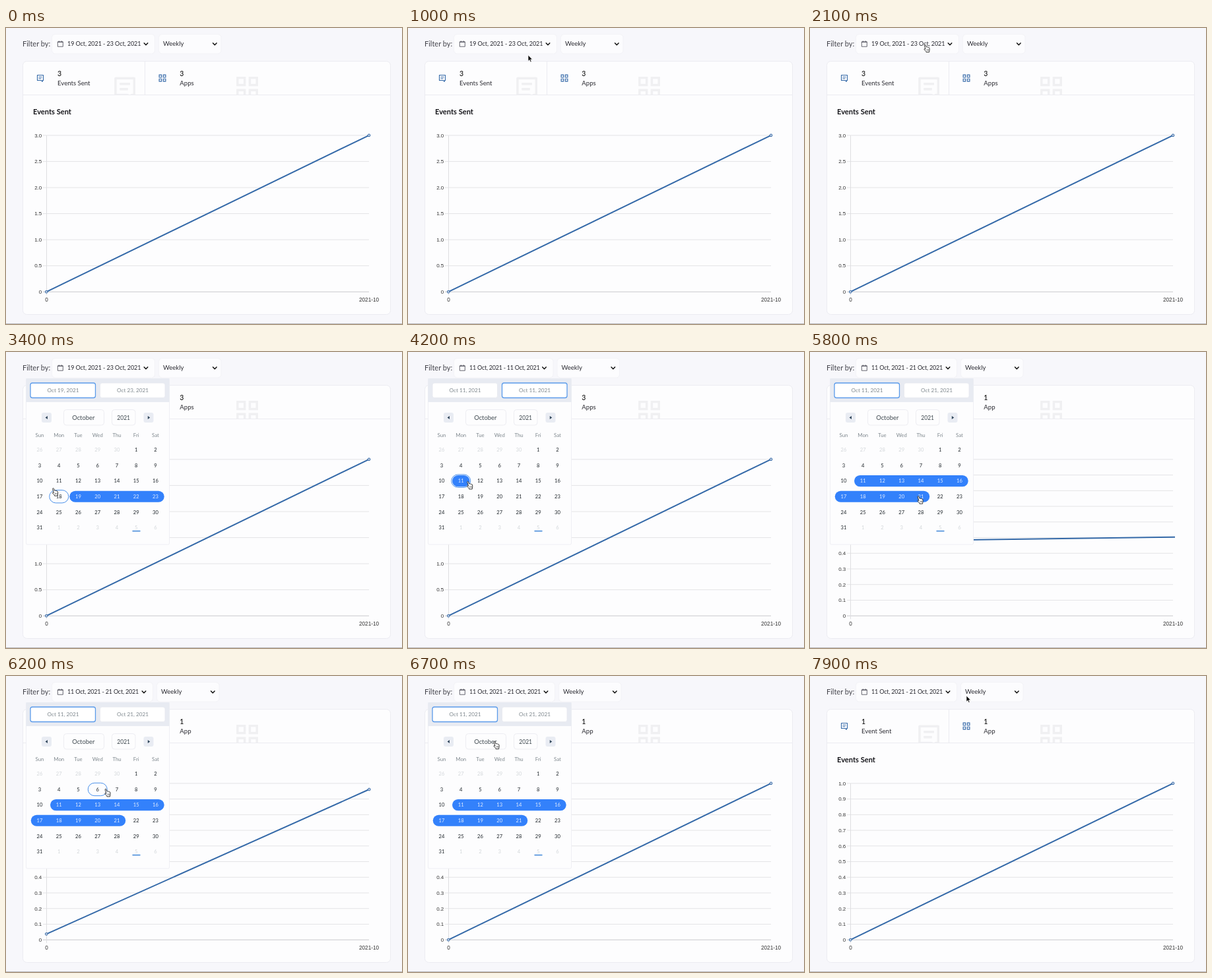
Animation, 600 px wide and 449 px high, one loop 8000 ms. Source, as an HTML page:

```html
<!DOCTYPE html>
<html lang="en">
<head>
<meta charset="utf-8">
<title>Events dashboard</title>
<style>
html, body { margin: 0; width: 100%; height: 100%; overflow: hidden; background: #f7f7fb; }
svg { display: block; width: 600px; height: 449px; font-family: Lato, sans-serif; cursor: default; }
.axis { font-family: "Liberation Sans", Arial, sans-serif; }
</style>
</head>
<body>
<svg id="stage" viewBox="0 0 600 449" xmlns="http://www.w3.org/2000/svg"></svg>
<script>
const LOOP = 8000;
const OPEN = 2200, PICK_START = 3900, PICK_END = 5500, LOADED = 5800, CLOSE = 7300;
const BLUE = '#3381fb', LINE = '#3469a8', INK = '#2b2b32';
const stage = document.getElementById('stage');

// time, x, y of the pointer tip
const POINTER = [
  [300, 320, 250], [1100, 176, 32], [1300, 173, 25], [2500, 173, 25],
  [3400, 70.5, 206.5], [3700, 79, 193], [4000, 79, 193], [4900, 162.5, 218.5],
  [5900, 163, 218.5], [6600, 130, 99], [6700, 130, 99], [7400, 138, 27],
  [7520, 138, 27], [7900, 237, 30]
];

const attrs = o => Object.entries(o).map(([k, v]) => ` ${k}="${v}"`).join('');
const rect = (x, y, w, h, r, fill, stroke = 'none', more = {}) =>
  `<rect${attrs({ x, y, width: w, height: h, rx: r, fill, stroke, ...more })}/>`;
const path = (d, stroke, width = 1, fill = 'none', more = {}) =>
  `<path${attrs({ d, stroke, 'stroke-width': width, fill, ...more })}/>`;
const text = (s, x, y, size, fill = INK, more = {}) =>
  `<text${attrs({ x, y, 'font-size': size, fill, ...more })}>${s}</text>`;
const MID = { 'text-anchor': 'middle' };

const mix = (a, b, p) => a + (b - a) * p;
const smooth = p => p * p * (3 - 2 * p);
const easeOut = p => 1 - (1 - p) ** 4;

function pointerAt(t) {
  if (t < POINTER[0][0]) return null;
  const next = POINTER.findIndex(k => k[0] > t);
  if (next < 0) return POINTER[POINTER.length - 1].slice(1);
  const [t0, x0, y0] = POINTER[next - 1], [t1, x1, y1] = POINTER[next];
  const p = smooth((t - t0) / (t1 - t0));
  return [mix(x0, x1, p), mix(y0, y1, p)];
}

const chevron = (x, y) =>
  path(`M${x - 2.7} ${y - 1.4}l2.7 2.8 2.7-2.8`, '#111', 1.5, 'none', { 'stroke-linecap': 'round' });

const messageIcon = (x, y, s, color, width) =>
  `<g transform="translate(${x} ${y}) scale(${s})">` +
  path('M1 1H10V9H8.8V10.8L6.8 9H1ZM3 3.7H8M3 6.2H7', color, width, 'none', { 'stroke-linejoin': 'round' }) + '</g>';

const gridIcon = (x, y, s, color, width) =>
  `<g transform="translate(${x} ${y}) scale(${s})">` +
  path('M.6.6H4.2V4.2H.6ZM6.8.6H10.4V4.2H6.8ZM.6 6.8H4.2V10.4H.6ZM6.8 6.8H10.4V10.4H6.8Z', color, width) + '</g>';

function backdrop() {
  return rect(0, 0, 600, 449, 0, '#f7f7fb') +
    rect(25.5, 50.5, 557, 384, 6, '#fdfdfe', '#ececf2') +
    path('M25 101.5H582M210.5 51V101', '#ececf1') +
    path('M0 448.5H600', '#bcbcc0') +
    '<clipPath id="cards"><path d="M25 51H582V101H25Z"/></clipPath><g clip-path="url(#cards)">' +
    messageIcon(162.8, 73.2, 3.15, '#f0f0f2', 1.1) + gridIcon(349, 73.8, 3, '#f0f0f2', 1.15) + '</g>' +
    messageIcon(46.5, 70.5, 1, LINE, 1.1) + gridIcon(231.5, 70.5, 1, LINE, 1.1) +
    text('Events Sent', 41, 131.3, 11.1, '#17171c', { 'font-weight': 700 });
}

function filters(t) {
  const [label, shift, spacing] =
    t < PICK_START ? ['19 Oct, 2021 - 23 Oct, 2021', 0, -.07] :
    t < PICK_END ? ['11 Oct, 2021 - 11 Oct, 2021', -5.5, -.25] :
    ['11 Oct, 2021 - 21 Oct, 2021', -3, -.19];
  return text('Filter by:', 25, 28.2, 11, '#44444b') +
    rect(69.5, 9.5, 156 + shift, 29.5, 5, '#fcfcfe', '#f3f3f7') +
    rect(231.5 + shift, 9.5, 94.5, 29.5, 5, '#fcfcfe', '#f3f3f7') +
    path('M78.3 21.4H86.3M78.3 20.9H86.3V28.2H78.3ZM80.3 19.4V21.4M84.3 19.4V21.4', '#55555e', .9) +
    text(label, 93, 27.4, 9, INK, { 'letter-spacing': spacing }) +
    chevron(212 + shift, 24.3) +
    text('Weekly', 238 + shift, 27.4, 9.5) + chevron(316.3 + shift, 24.3);
}

function cards(t) {
  const one = t >= LOADED;
  const names = one ? ['Event Sent', 'App'] : ['Events Sent', 'Apps'];
  return names.map((name, i) => {
    const x = 78 + i * 185.3;
    return text(one ? 1 : 3, x, 73, 10.5, '#111', { 'font-weight': 500 }) + text(name, x, 87.4, 9.6);
  }).join('');
}

function chart(t) {
  const old = t < PICK_END, max = old ? 3 : 1, steps = old ? 6 : 10;
  let out = '<g class="axis">';
  for (let i = 0; i <= steps; i++) {
    const y = 400.2 - 237.3 * i / steps;
    out += path(`M56 ${y}H550`, i ? '#e4e4e6' : '#c9c9cc') +
      text(i ? (max * i / steps).toFixed(1) : '0', 54.3, y + 2.8, 8, '#333', { 'text-anchor': 'end' });
  }
  out += path('M61.5 163V405', '#dedee1');
  if (old || t >= LOADED) {
    const p = old ? 1 : easeOut(Math.min(1, (t - LOADED) / 850));
    const left = mix(286.8, 400.2, p), right = mix(281.3, 162.8, p), end = mix(553, 550, p);
    out += text('0', 61.5, 414.6, 8.2, '#333', MID) + text('2021-10', 550, 414.6, 8.2, '#333', MID) +
      path(`M61.3 ${left}L${end} ${right}`, LINE, 2);
    if (p > .1) for (const [x, y] of [[61.3, left], [end, right]])
      out += `<circle cx="${x}" cy="${y}" r="1.9" fill="#c3d0e2" stroke="${LINE}"/>`;
  }
  return out + '</g>';
}

const cellX = i => 51 + (i % 7) * 29.25;
const cellY = i => 148.3 + Math.floor(i / 7) * 23.65;
const dayCell = day => day + 4;

// one rounded bar for each calendar week touched by the range
function band(first, last, filled) {
  let out = '';
  for (let a = first; a <= last; a = (Math.floor(a / 7) + 1) * 7) {
    const b = Math.min(last, Math.floor(a / 7) * 7 + 6);
    const px = filled ? 13.2 : 14.5, py = filled ? 8.6 : 9.7;
    out += rect(cellX(a) - px, cellY(a) - py, cellX(b) - cellX(a) + 2 * px, 2 * py, py,
      filled ? BLUE : 'none', filled ? 'none' : '#4a90ea');
  }
  return out;
}

// the hot spot sits inside the fingertip, a little below the drawn tip
function cellUnder(pos) {
  if (!pos) return -1;
  const col = Math.round((pos[0] + 1 - 51) / 29.25), row = Math.round((pos[1] + 2 - 148.3) / 23.65);
  return col >= 0 && col < 7 && row >= 0 && row < 6 ? row * 7 + col : -1;
}

function dateInput(x, label, active) {
  return rect(x + .5, 47, 98.5, 22.5, 3, '#fff', active ? '#5b9bea' : '#e6e8ee', { 'stroke-width': active ? 1.3 : .8 }) +
    text(label, x + 50, 61.2, 8.2, '#7f888e', MID);
}

function calendar(t, hover) {
  const choosing = t >= PICK_START && t < PICK_END;
  const [from, to] = t < PICK_START ? [19, 23] : choosing ? [11, 11] : [11, 21];
  const first = dayCell(from), last = dayCell(to);
  let out = rect(30.5, 40.5, 217, 251.5, 2, '#fdfdfe', '#efeff4') +
    rect(30.5, 40, 217, 36, 0, '#e8ebf2') +
    dateInput(36.5, `Oct ${from}, 2021`, !choosing) + dateInput(142, `Oct ${to}, 2021`, choosing) +
    rect(54, 92, 15, 15, 3, '#e9ecf3') + rect(208.5, 92, 15, 15, 3, '#e9ecf3') +
    path('M63 97V102L59.5 99.5ZM214.8 97V102L218.3 99.5Z', 'none', 0, '#34495e') +
    rect(87.5, 87.5, 61, 23.5, 4, '#fdfdfe', '#ededf2') + rect(160.5, 87.5, 35.5, 23.5, 4, '#fdfdfe', '#ededf2') +
    text('October', 117.3, 102.5, 9.4, '#3e484f', MID) + text('2021', 178.2, 102.5, 8.5, '#3e484f', MID);
  ['Sun', 'Mon', 'Tue', 'Wed', 'Thu', 'Fri', 'Sat'].forEach((name, i) => {
    out += text(name, cellX(i), 128.7, 7.8, '#7f888e', MID);
  });
  out += band(first, last, true);
  if (hover >= 0) {
    if (choosing) out += band(Math.min(first, hover), Math.max(first, hover), false);
    else if (hover < first || hover > last) out += band(hover, hover, false);
  }
  for (let i = 0; i < 42; i++) {
    const day = i < 5 ? 26 + i : i < 36 ? i - 4 : i - 35;
    const color = i >= first && i <= last ? '#e4eeff' : i < 5 || i > 35 ? '#d3d7da' : '#1d2429';
    out += text(day, cellX(i), cellY(i) + 2.8, 7.6, color, MID);
  }
  return out + path('M191.5 271.6H203.5', '#3d85d8', 1.5);
}

function pointer([x, y], hand) {
  const shape = hand
    ? path('M.2 1.4C-.2 0 1.5-.5 2 .8L3 3.8Q4 3 4.8 4Q5.9 3.4 6.4 4.5Q7.8 4.2 8 5.8Q8.4 8 7.8 9.8L7.6 11.7H3L2.8 10.5L.2 7.8C-.6 6.8.6 6.1 1.3 6.8L2 7.2Z', '#222', .9, '#fff') +
      path('M4 7.2V9.6M5.4 7.2V9.6M6.7 7.2V9.6', '#444', .6)
    : path('M0 0V9L2.1 7.1 3.5 10.3 5 9.7 3.6 6.6H6.3Z', '#fff', .6, '#000');
  return `<g transform="translate(${x} ${y})">${shape}</g>`;
}

const still = backdrop();

function draw(now) {
  const t = now % LOOP;
  const open = t >= OPEN && t < CLOSE;
  const pos = pointerAt(t);
  const hover = open ? cellUnder(pos) : -1;
  let out = still + filters(t) + cards(t) + chart(t);
  if (open) out += calendar(t, hover);
  if (pos) {
    const [x, y] = pos;
    const onFilter = y < 39 && x > 70 && x < 222;
    const onMonth = open && y > 87 && y < 111 && x > 54 && x < 223;
    out += pointer(pos, onFilter || onMonth || hover >= 0);
  }
  stage.innerHTML = out;
}

const start = performance.now();
function tick() {
  draw(performance.now() - start);
  requestAnimationFrame(tick);
}
tick();
</script>
</body>
</html>
```
